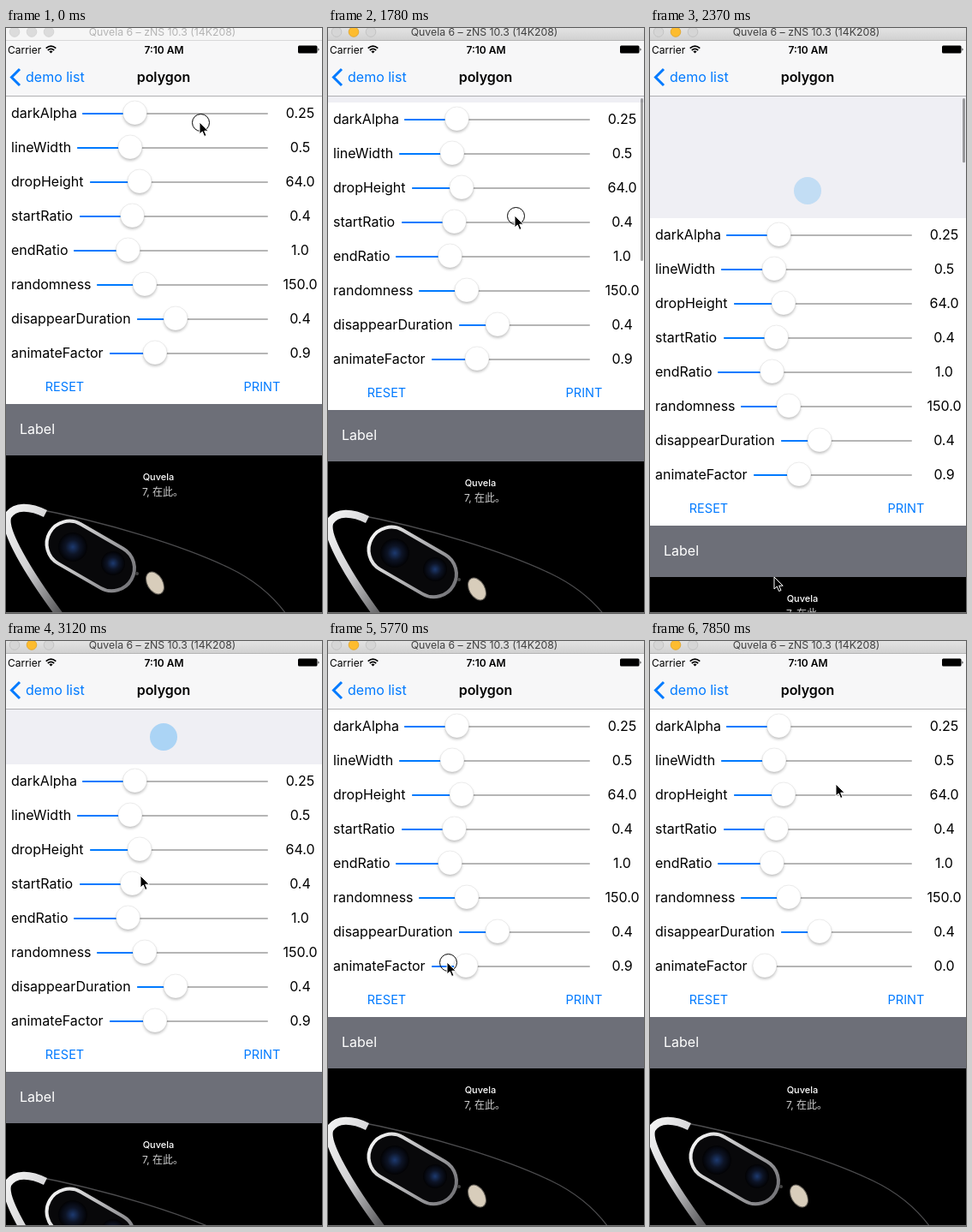
Write an HTML page that moves like this. It is 369x683 px and loops after 8000 ms.

```html
<!DOCTYPE html>
<html lang="en">
<head>
<meta charset="utf-8">
<title>Pull to refresh demo</title>
<style>
  html, body { margin: 0; width: 100%; height: 100%; overflow: hidden; background: #efeff4; }
  svg { display: block; width: 369px; height: 683px; font: 16px Inter, "Noto Sans", sans-serif; }
  .blue { fill: #007aff; }
  .mid { text-anchor: middle; }
  .knob { fill: #fff; stroke: rgba(0,0,0,.13); stroke-width: .6; filter: drop-shadow(0 2.5px 1.5px rgba(0,0,0,.22)); }
</style>
</head>
<body>
<svg viewBox="0 0 369 683">
  <defs>
    <linearGradient id="bar" x2="0" y2="1"><stop stop-color="#e3e3e3"/><stop offset="1" stop-color="#d1d1d1"/></linearGradient>
    <linearGradient id="rim" x2="1" y2="1"><stop stop-color="#f4f4f4"/><stop offset=".45" stop-color="#d2d2d4"/><stop offset="1" stop-color="#4a4a4c"/></linearGradient>
    <linearGradient id="ring" x2="1" y2="0"><stop stop-color="#f2f2f2"/><stop offset="1" stop-color="#77777b"/></linearGradient>
    <radialGradient id="lens"><stop stop-color="#1d3a70"/><stop offset=".5" stop-color="#0d1426"/><stop offset="1" stop-color="#020204"/></radialGradient>
  </defs>

  <rect width="369" height="683" fill="#efeff4"/>
  <circle id="badge" cx="184" r="16" fill="#a9d3f5"/>

  <g id="page">
    <rect y="80" width="369" height="360" fill="#fff"/>
    <g id="rows"></g>
    <g class="blue mid" font-size="14.5">
      <text x="68.5" y="424">RESET</text>
      <text x="299" y="424">PRINT</text>
    </g>
    <rect y="439" width="369" height="60" fill="#6d6f78"/>
    <text x="16" y="474" fill="#fff">Label</text>
    <rect y="499" width="369" height="190" fill="#000"/>
    <g fill="none">
      <path d="M28 560C120 577 210 606 260 630Q302 650 327 684" stroke="#4c4c4e" stroke-width="1.3"/>
      <path d="M46 567C28 558 10 557 2 570C-4 585 24 634 66 690" stroke="url(#rim)" stroke-width="9"/>
      <g transform="rotate(30 99 616)">
        <rect x="44" y="590" width="110" height="53" rx="26.5" fill="#08080a" stroke="url(#ring)" stroke-width="4"/>
      </g>
      <circle cx="78" cy="606" r="17" fill="url(#lens)"/>
      <circle cx="125" cy="625" r="14" fill="url(#lens)"/>
      <circle cx="153" cy="637" r="2" fill="#444"/>
      <ellipse cx="174" cy="648" rx="9" ry="14" transform="rotate(-30 174 648)" fill="#d8cdbb" stroke="#6b665e"/>
    </g>
    <text class="mid" x="178" y="528" font-size="11" font-weight="500" fill="#fff">Quvela</text>
    <text x="159" y="546" font-size="12" fill="#ccc" font-family="Inter, 'Noto Sans CJK SC', 'Noto Sans CJK', sans-serif">7, 在此。</text>
  </g>
  <rect y="682" width="369" height="1" fill="#777"/>
  <rect id="scroll" x="365" y="82" width="3" rx="1.5" fill="#000" fill-opacity=".36"/>

  <rect width="369" height="79" fill="#f7f7f8"/>
  <rect y="79" width="369" height="1" fill="#b0b0b3"/>
  <rect id="frame" width="369" height="14"/>
  <rect id="edge" y="14" width="369" height="1"/>
  <g id="lights" stroke-width=".8">
    <circle cx="10" cy="4.5" r="5.8"/><circle cx="30" cy="4.5" r="5.8"/><circle cx="50" cy="4.5" r="5.8"/>
  </g>
  <text id="title" class="mid" x="182.5" y="9" font-size="12.3">Quvela 6 – zNS 10.3 (14K208)</text>

  <text x="2" y="29.5" font-size="12">Carrier</text>
  <g fill="none" stroke="#000" stroke-width="1.7">
    <path d="M46.7 23.6Q52.5 18.6 58.3 23.6M48.8 26Q52.5 22.8 56.2 26"/>
  </g>
  <path d="M50.4 27.4Q52.5 25.6 54.6 27.4L52.5 29.6Z"/>
  <text class="mid" x="184.5" y="29.5" font-size="12" font-weight="600">7:10 AM</text>
  <rect x="341" y="20.5" width="22.5" height="9" rx="1.5"/>
  <path d="M364.5 23.2Q366.5 25 364.5 26.8Z"/>
  <path d="M16 48L6.5 57.5L16 67" fill="none" stroke="#007aff" stroke-width="3"/>
  <text class="blue" x="23" y="63">demo list</text>
  <text class="mid" x="184" y="63" font-weight="600">polygon</text>

  <g id="pointer">
    <circle id="touch" cx="1.5" cy=".5" r="10" fill="none" stroke="#000"/>
    <path d="M0 0V14L3.3 11L5.6 16.5L8 15.5L5.7 10.2H10.2Z" stroke="#fff" stroke-width="1"/>
  </g>
</svg>
<script>
const $ = id => document.getElementById(id);
const LOOP = 8000, TICKS = 54, STEP = LOOP / TICKS;

// name, track start, knob centre, value
const sliders = [
  ['darkAlpha', 89, 150.5, '0.25'],
  ['lineWidth', 83, 145, '0.5'],
  ['dropHeight', 98, 156, '64.0'],
  ['startRatio', 86, 147.5, '0.4'],
  ['endRatio', 79, 142.5, '1.0'],
  ['randomness', 106, 162, '150.0'],
  ['disappearDuration', 153, 198, '0.4'],
  ['animateFactor', 121, 174, '0.9']
];
$('rows').innerHTML = sliders.map(([name, start, knob, value], i) => {
  const y = 99 + 40 * i;
  return `<text x="6" y="${y + 6}">${name}</text>
    <rect x="${start}" y="${y}" width="${306 - start}" height="2" rx="1" fill="#b5b5b5"/>
    <rect class="blue" x="${start}" y="${y}" width="${knob - start}" height="2" rx="1"/>
    <circle class="knob" cx="${knob}" cy="${y}" r="14"/>
    <text class="mid" x="343.5" y="${y + 6}">${value}</text>`;
}).join('');
const [, , fill, knob, value] = $('rows').querySelectorAll(':scope > :nth-last-child(-n+5)');

// Tracks are [tick, ...values], joined by straight lines
const pull = [[11, 0], [12, 7], [13, 48], [14, 98], [15, 134], [16, 142], [17, 86], [18, 64], [31, 64], [32, 49], [33, 14], [34, 0]];
const glow = [[12, 0], [14, .3], [16, .65], [18, .85], [30, .85], [32, .4], [34, 0]];
const drag = [[38, 174], [39, 161], [41, 134]];
const path = [
  [0, 226, 110], [2, 226, 110], [4, 205, 300], [6, 165, 640], [7, 165, 640], [9, 212, 260],
  [10, 219, 202], [11, 219, 204], [12, 218, 219], [13, 205, 330], [14, 178, 470], [15, 152, 598],
  [16, 145, 641], [17, 143, 540], [18, 140, 338], [19, 141, 325], [20, 147, 298], [21, 157, 274],
  [26, 158, 276], [28, 164, 330], [30, 169, 402], [32, 170, 418], [34, 171, 412], [37, 168, 376],
  [38, 160, 375], [39, 139, 375], [42, 79, 372], [43, 80, 370], [47, 157, 302], [48, 157, 302],
  [50, 176, 254], [53, 217, 167]
];

function at(track, k) {
  let n = track.findIndex(p => p[0] > k);
  if (n < 0) n = track.length;
  const a = track[Math.max(n - 1, 0)], b = track[Math.min(n, track.length - 1)];
  const u = b[0] > a[0] ? Math.max(0, (k - a[0]) / (b[0] - a[0])) : 0;
  return a.slice(1).map((v, i) => v + (b[i + 1] - v) * u);
}
const within = (k, a, b) => k >= a && k <= b;
const set = (el, attrs) => { for (const key in attrs) el.setAttribute(key, attrs[key]); };
const show = (el, on) => set(el, { visibility: on ? 'visible' : 'hidden' });

function draw(k) {
  const [off] = at(pull, k), [x, y] = at(path, k), [pos] = at(drag, k);
  set($('page'), { transform: `translate(0 ${off})` });
  const shimmer = within(k, 18, 30) ? .15 * Math.sin(k * 1.3) : 0;
  set($('badge'), { cy: 48 + off, opacity: at(glow, k)[0] + shimmer });
  set($('scroll'), { height: 196 - .85 * off });
  show($('scroll'), within(k, 11, 17));

  set(knob, { cx: pos });
  set(fill, { width: pos - 121 });
  show(fill, pos > 134);
  value.textContent = k < 43 ? '0.9' : '0.0';

  const active = k >= 3;
  set($('frame'), { fill: active ? 'url(#bar)' : '#f6f6f6' });
  set($('edge'), { fill: active ? '#b4b4b4' : '#d9d9d9' });
  set($('title'), { fill: active ? '#404040' : '#b4b4b4' });
  [...$('lights').children].forEach((c, i) => {
    const lit = active && i === 1;
    set(c, { fill: lit ? '#fdbc2f' : active ? '#d6d6d6' : '#dcdcdc', stroke: lit ? '#dfa023' : active ? '#bdbdbd' : '#d0d0d0' });
  });

  set($('pointer'), { transform: `translate(${x} ${y})` });
  show($('touch'), k < 1 || within(k, 11, 15) || within(k, 37, 42));
}

const begin = performance.now();
function loop() {
  const t = (performance.now() - begin) % LOOP;
  draw(Math.min(TICKS - 1, Math.floor((t + 15) / STEP)));
  requestAnimationFrame(loop);
}
loop();
</script>
</body>
</html>
```
